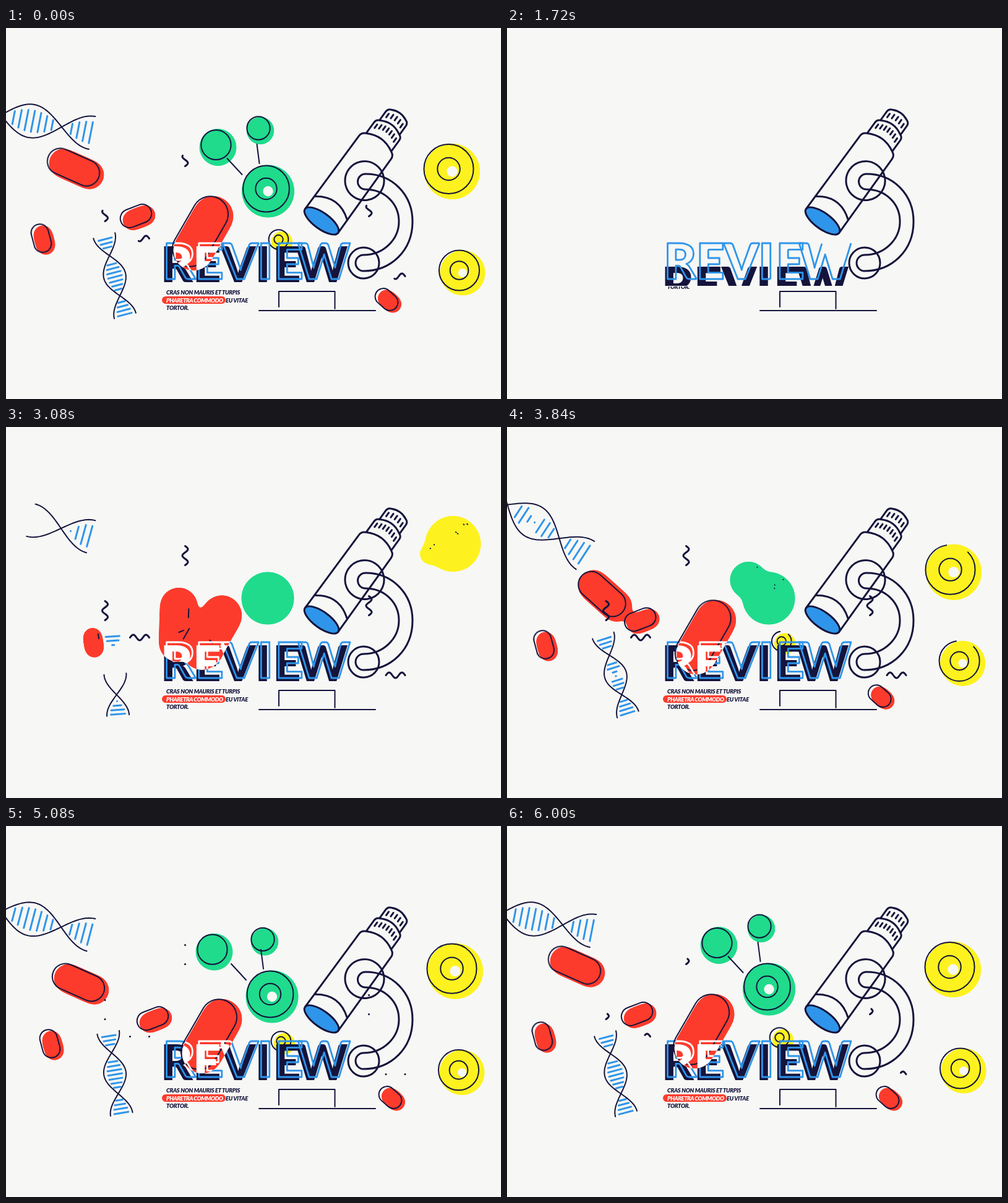
Write an HTML page that moves like this. It is 800 px wide and 600 px high and loops after 6.04 s.

```html
<!DOCTYPE html>
<html lang="en">
<head>
<meta charset="utf-8">
<title>Review</title>
<style>
  :root { --bg: #f7f7f5; --navy: #14143c; --blue: #2f95ea; --red: #fd3b2c; --green: #20db8c; --yellow: #fdf21f; }
  html, body { margin: 0; width: 100%; height: 100%; overflow: hidden; background: var(--bg); }
  svg { display: block; width: 100vw; height: 100vh; }
  .ink { fill: none; stroke: var(--navy); stroke-width: 2; stroke-linecap: round; stroke-linejoin: round; }
  .bold { stroke-width: 3; }
  .solid { fill: var(--bg); }
  .tick { stroke: var(--blue); stroke-width: 3; }
  .goo { filter: url(#goo); }
  .title { font: 900 79px Lato, sans-serif; text-anchor: middle; }
  .face { fill: var(--face, var(--navy)); }
  .edge { fill: none; stroke: var(--edge, var(--blue)); stroke-width: 2.8; stroke-linejoin: round; }
  .copy { font: italic 900 9.4px Lato, sans-serif; letter-spacing: -.28px; fill: var(--navy); }
  .copy .hot { fill: #fff; letter-spacing: -.45px; }
</style>
</head>
<body>
<svg viewBox="0 0 800 600">
  <defs>
    <filter id="goo" filterUnits="userSpaceOnUse" x="-50" y="0" width="900" height="600" color-interpolation-filters="sRGB">
      <feGaussianBlur stdDeviation="6"/>
      <feColorMatrix values="1 0 0 0 0  0 1 0 0 0  0 0 1 0 0  0 0 0 20 -9.5"/>
    </filter>
    <mask id="redArea" maskUnits="userSpaceOnUse" x="0" y="0" width="800" height="600" style="mask-type:alpha">
      <use href="#red"/>
    </mask>
    <clipPath id="faceClip"><rect x="240" y="340" width="330" height="77"/></clipPath>
    <clipPath id="copyClip"><rect x="240" y="418" width="170" height="50"/></clipPath>
  </defs>

  <g id="yellow" class="goo" fill="var(--yellow)"></g>
  <g id="green" class="goo" fill="var(--green)"></g>
  <g id="discInk"></g>

  <g id="scope">
    <g id="ocular">
      <path class="ink bold solid" d="M-20-186V-204Q-20-210-14-212Q0-219 14-212Q20-210 20-204V-186"/>
    </g>
    <g id="collar">
      <path class="ink bold solid" d="M-25-158V-179Q-25-185-19-187Q0-198 19-187Q25-185 25-179V-158"/>
    </g>
    <path class="ink bold solid" d="M-33 0L-32-147Q-32-154-25-157Q0-171 25-157Q32-154 32-147L33 0"/>
    <path class="ink bold" d="M-32-26Q0-50 32-26"/>
    <path class="ink bold" id="lens" d="M-33 0A33 13 0 1 1 33 0A33 13 0 1 1-33 0" style="fill:var(--blue)"/>
  </g>
  <path class="ink bold" id="arm"/>
  <path class="ink" id="bracket" d="M441 451V426H531.500V454"/>
  <path class="ink" id="ground" d="M597 457H409"/>

  <g id="title" class="title">
    <g clip-path="url(#faceClip)">
      <text class="face" id="face" x="276 325 375 415 454 510">REVIEW</text>
    </g>
    <text class="edge" id="edge" x="280 329 379 419 458 514" y="406">REVIEW</text>
  </g>

  <g id="red" class="goo" fill="var(--red)"></g>
  <g id="pillInk"></g>
  <use href="#title" mask="url(#redArea)" style="--face:#fff;--edge:#fff"/>

  <g clip-path="url(#copyClip)">
    <g id="copy">
      <rect id="bar" y="434" height="12" rx="6" fill="var(--red)"/>
      <text class="copy">
        <tspan x="259" y="431">CRAS NON MAURIS ET TURPIS</tspan>
        <tspan class="hot" x="259" y="443.500">PHARETRA COMMODO</tspan>
        <tspan x="355" y="443.500">EU VITAE</tspan>
        <tspan x="259" y="456">TORTOR.</tspan>
      </text>
    </g>
  </g>
  <g id="overlay"></g>
</svg>

<script>
const LOOP = 6040, CUT = 360;
const $ = id => document.getElementById(id);
const parts = [];

function add(parent, tag, attrs = {}) {
  const el = document.createElementNS('http://www.w3.org/2000/svg', tag);
  for (const k in attrs) el.setAttribute(k, attrs[k]);
  return parent.appendChild(el);
}

const mix = (a, b, u) => a + (b - a) * u;
const unit = (t, a, b) => Math.min(1, Math.max(0, (t - a) / (b - a)));
const ramp = (t, a, b) => { const u = unit(t, a, b); return u * u * (3 - 2 * u); };
const out = (t, a, b) => 1 - (1 - unit(t, a, b)) ** 3;
const wave = (t, peak, period) => (1 + Math.cos(2 * Math.PI * (t - peak) / period)) / 2;

// Shows only the part of a stroke between the fractions s and e.
function trim(el, s, e) {
  el.style.display = e > s ? '' : 'none';
  el.setAttribute('pathLength', 100);
  if (s <= 0 && e >= 1) return el.removeAttribute('stroke-dasharray');
  el.setAttribute('stroke-dasharray', `${100 * (e - s)} 200`);
  el.setAttribute('stroke-dashoffset', -100 * s);
}

const place = (el, x, y, angle = 0, scale = 1) =>
  el.setAttribute('transform', `translate(${x} ${y}) rotate(${angle}) scale(${scale})`);

const ringPath = r => `M${r} 0A${r} ${r} 0 1 1 ${-r} 0A${r} ${r} 0 1 1 ${r} 0`;

function addRing(parent, x, y, r, angle, cls) {
  return add(parent, 'path', { class: cls, d: ringPath(r), transform: `translate(${x} ${y}) rotate(${angle})` });
}

// A body pops up at `from`, flies to `home` and then sways around it.
function pose(t, { pop, from, home, sway, fly }) {
  const p = ramp(t, fly[0], fly[0] + fly[1]);
  const drift = [sway[0] * wave(t, 5080, 1920), sway[1] * wave(t, 4460, 3160)];
  const [x, y] = [0, 1].map(i => mix(from[i], home[i] + drift[i], p));
  return { x, y, p, scale: ramp(t, pop, pop + 260) };
}

function pill(half, r, angle, o) {
  const shape = q => ({ x: -half - q, y: -q, width: 2 * (half + q), height: 2 * q, rx: q });
  const body = add($('red'), 'rect', shape(r));
  const line = add($('pillInk'), 'rect', { class: 'ink', ...shape(r * .88) });
  parts.push(t => {
    const { x, y, p, scale } = pose(t, { pop: 1960, ...o });
    const turn = mix(o.fromAngle ?? angle, angle, p);
    place(body, x, y, turn, scale * mix(o.swell ?? 1, 1, p));
    place(line, x - 5, y - 3, turn);
    trim(line, 0, ramp(t, 2960, 3760));
  });
}

pill(32, 33, -60, { from: [315, 343], home: [319, 332], sway: [14, 12], fly: [1960, 600] });
pill(23, 24, 24, { from: [286, 324], home: [114, 228], sway: [8, 42], fly: [2900, 1400], fromAngle: 95, swell: 1.3 });
pill(11, 17, -21, { from: [300, 345], home: [215, 307], sway: [27, 11], fly: [3080, 700] });
pill(9, 16, 75, { from: [285, 360], home: [62, 343], sway: [14, 18], fly: [2360, 1150], fromAngle: 95 });
pill(7, 15, 42, { from: [330, 362], home: [620, 442], sway: [6, 0], fly: [3060, 900] });

function disc(color, r, sizes, shift, start, o, links = []) {
  const body = add($(color), 'circle', { r });
  const top = add($('discInk'), 'g');
  const rings = sizes.map(k => addRing(top, -shift, -4, r * k, -45, 'ink'));
  const hole = add(top, 'circle', { fill: 'var(--bg)' });
  const rods = links.map(d => add(top, 'path', { class: 'ink', d }));
  parts.push(t => {
    const { x, y, scale } = pose(t, o);
    place(body, x, y, 0, scale);
    place(top, x, y);
    rings.forEach((ring, i) => trim(ring, 0, ramp(t, start, start + 1060 - 270 * i)));
    hole.setAttribute('r', r > 35 ? .19 * r * ramp(t, start + 400, start + 760) : 0);
    rods.forEach(rod => trim(rod, 0, ramp(t, start + 760, start + 1120)));
  });
}

const yellow = (r, o) => disc('yellow', r, [.88, .4], 5.5, 3040, { from: [722, 184], ...o });
yellow(45.5, { pop: 1980, home: [721, 232], sway: [5, 4], fly: [2900, 900] });
yellow(37, { pop: 2400, home: [738, 396], sway: [-1, 4], fly: [3060, 940] });
yellow(18, { pop: 2400, home: [446, 346], sway: [4, 9], fly: [2840, 1060] });

const green = (r, sizes, o, links) => disc('green', r, sizes, 3, 3820, { pop: 2700, from: [423, 277], ...o }, links);
green(43, [.87, .4], { home: [423.5, 264], sway: [6.5, 18], fly: [3820, 700] }, ['M-66-53L-42-27', 'M-18-76L-14-45']);
green(30.5, [.79], { home: [342.5, 193], sway: [-6, 16], fly: [3300, 1250] });
green(23, [.81], { home: [411, 166], sway: [7, 32], fly: [3720, 900] });

// Helix: amp is half the width, span the distance between crossings.
function helix(amp, span, step, sway) {
  const g = add($('overlay'), 'g');
  const curve = x => amp * Math.sin(Math.PI * x / span);
  const first = -1.5 * span, last = span / 2, ticks = [];
  for (let x = last - 2; x > first; x -= step) {
    const y = Math.abs(curve(x));
    if (y < .45 * amp) continue;
    const begin = 2660 + 2400 * Math.min(last - x, x - first) / (2 * span);
    ticks.push({ el: add(g, 'path', { class: 'ink tick' }), x, y: y * .64, begin });
  }
  const strands = [1, -1].map(side => {
    const pts = Array.from({ length: 81 }, (_, i) => {
      const x = last - i * span / 40;
      return `${x.toFixed(2)} ${(side * curve(x)).toFixed(2)}`;
    });
    return add(g, 'path', { class: 'ink', d: 'M' + pts.join('L') });
  });
  parts.push(t => {
    place(g, ...sway(t));
    strands.forEach(s => trim(s, 0, ramp(t, 2440, 3720)));
    ticks.forEach(({ el, x, y, begin }) => {
      const k = ramp(t, begin, begin + 200);
      el.style.display = k ? '' : 'none';
      el.setAttribute('d', `M${x} ${-y * k}V${y * k}`);
    });
  });
}

helix(27, 100, 10.6, t => {
  const g = Math.exp(-(((t - 4060) / 750) ** 2));
  return [90 - 6 * g, 160 + 22 * g, 11 + 24 * g];
});
helix(18, 67, 7, t => {
  const swing = 8.5 * Math.exp((3080 - t) / 2200) * Math.cos(2 * Math.PI * (t - 3080) / 1900);
  return [183 - .5 * swing, 433, 77.5 + swing];
});

// Squiggles: the head holds the start of the stroke, the tail its end.
function squiggle(x, y, angle) {
  const g = add($('overlay'), 'g', { transform: `translate(${x} ${y}) rotate(${angle})` });
  const pts = Array.from({ length: 32 }, (_, i) => `${(4.5 * Math.sin(i / 31 * 3 * Math.PI)).toFixed(2)} ${i - 15.5}`);
  const [head, tail] = [0, 1].map(() => add(g, 'path', { class: 'ink bold', d: 'M' + pts.join('L') }));
  parts.push(t => {
    const half = t > 4300 && t < 5240 ? .001 + .5 * (1 - ramp(t, 4300, 5060)) : 0;
    const end = t <= 4300 ? ramp(t, 2700, 3000) : half || ramp(t, 5930, 6140);
    trim(head, 0, half);
    trim(tail, 1 - end, 1);
  });
}

squiggle(289.5, 208, 0);
squiggle(160, 297, 0);
squiggle(216, 340.5, -90);
squiggle(586.5, 289, 0);
squiggle(629.5, 401.5, -90);

// Microscope.
function ridges(id, count, half, top, bulge) {
  for (let i = 0; i < count; i++) {
    const u = 2 * i / (count - 1) - 1;
    add($(id), 'path', { class: 'ink bold', d: `M${half * u} ${top + bulge * u * u}v7` });
  }
}
ridges('collar', 7, 19, -185, 6);
ridges('ocular', 5, 14, -208, 4);

const tubeLines = [...$('scope').querySelectorAll('path')];
const rings = [
  addRing($('overlay'), 579.5, 247, 31.5, -55, 'ink bold'),
  addRing($('overlay'), 578, 380, 25, -92, 'ink bold')
];
const dashes = [0, 1].map(i =>
  add($('overlay'), 'path', { class: 'ink bold', d: `M${541 - 2 * i} ${184.5 + 18 * i}l-71 79.5` }));

parts.push(t => {
  const grow = out(t, 440, 1500);
  $('scope').style.display = t < 440 ? 'none' : '';
  $('scope').setAttribute('transform',
    `translate(568.8 231.1) rotate(36) scale(${mix(.8, 1, grow)} ${mix(.4, 1, grow)}) translate(0 100)`);
  tubeLines.forEach(l => trim(l, 0, ramp(t, 420, 820)));
  $('lens').style.fillOpacity = ramp(t, 560, 680);
  place($('ocular'), 0, 105 * (1 - grow));
  place($('collar'), 0, 36 * (1 - ramp(t, 640, 960)));

  rings.forEach(r => trim(r, 0, out(t, 440, 1325)));
  const reach = 657 + 150 * Math.exp((500 - t) / 150);
  const foot = 578 + 60 * (1 - ramp(t, 480, 1200));
  $('arm').setAttribute('d', `M${foot} 393A13 13 0 0 1 ${foot} 367C610 367 ${reach - 22} 342 ${reach - 22} 313
    C${reach - 22} 284 612 261 581 261A12.5 12.5 0 0 1 581 236C625 236 ${reach} 270 ${reach} 313C${reach} 360 622 393 ${foot} 393`);
  trim($('arm'), 0, out(t, 440, 1520));

  dashes.forEach(d => trim(d, ramp(t, 860, 1140), ramp(t, 780, 1080)));
  trim($('bracket'), 0, ramp(t, 840, 1460));
  trim($('ground'), 0, ramp(t, 840, 1460));
});

// Title and copy.
parts.push(t => {
  $('face').setAttribute('y', mix(481, 411, out(t, 1440, 2700)));
  const edge = 420 * ramp(t, 1320, 1900);
  $('edge').style.display = edge ? '' : 'none';
  $('edge').setAttribute('stroke-dasharray', edge >= 420 ? 'none' : `${edge} 500`);
  place($('copy'), 0, mix(-48, 0, out(t, 1600, 2700)));
  const left = mix(355, 252, out(t, 1640, 2700));
  $('bar').setAttribute('x', left);
  $('bar').setAttribute('width', 355 - left);
});

const began = performance.now();
function tick() {
  const t = (performance.now() - began) % LOOP;
  const scene = t < CUT ? t + LOOP : t;
  parts.forEach(p => p(scene));
  requestAnimationFrame(tick);
}
tick();
</script>
</body>
</html>
```
